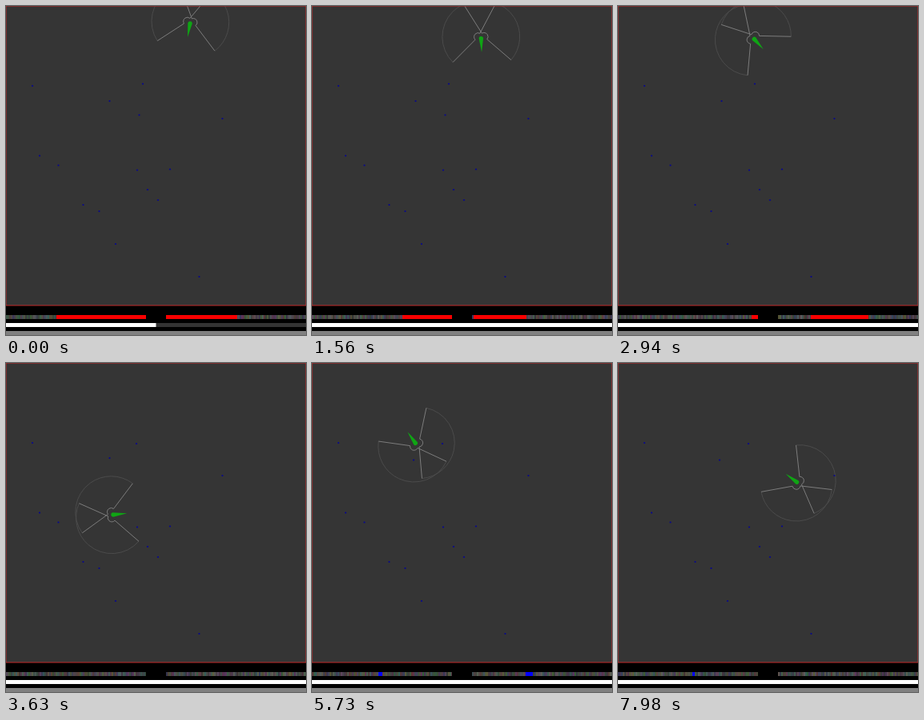
Animation, 375 px wide and 412 px high, one loop 8000 ms. Source, as an HTML page with a canvas:

```html
<!DOCTYPE html>
<html lang="en">
<head>
<meta charset="utf-8">
<title>Agent with two eyes</title>
<style>
  html, body { margin: 0; width: 100%; height: 100%; overflow: hidden; background: #000; }
  canvas { display: block; width: 375px; height: 412px; }
</style>
</head>
<body>
<canvas id="stage" width="375" height="412"></canvas>
<script>
const ctx = document.getElementById('stage').getContext('2d');
const LOOP = 8000, STEP = 30, SIZE = 375;
const RANGE = 44.7, EYE = 5, STRIP = 175, TURN = 42;
const rad = deg => deg * Math.PI / 180;
const mix = (a, b, k) => a + (b - a) * k;

const poses = [
  { t: 0, x: 230, y: 22, deg: -80 },
  { t: 870, x: 217.5, y: 4.4, deg: -104 },
  { t: 2280, x: 205, y: 129, deg: -80 },
  { t: 3630, x: 134, y: 190, deg: -186 },
  { t: 5730, x: 129.3, y: 100.4, deg: -305 },
  { t: 6960, x: 233.7, y: 76.1, deg: -318 },
  { t: LOOP, x: 223.3, y: 155, deg: -323.4 }
];

// The agent bumps into the first dots: two get pushed, one is eaten.
const pushed = [
  { from: [171, 97.5], to: [163, 101], at: 3000 },
  { from: [129.5, 119], to: [127, 121.5], at: 4900 },
  { from: [166.5, 136.5], at: 2850 }
];
const still = [
  [33, 100], [270.5, 141], [42, 187.5], [65.5, 199.5], [164, 205.5], [205, 204.5],
  [177, 230], [190, 243], [96.5, 249], [116.5, 257], [137, 298], [241.5, 339]
];

function dotsAt(t) {
  const moving = pushed.map(d => t < d.at ? d.from : d.to).filter(Boolean);
  return still.concat(moving);
}

// Between two poses the agent runs up towards the top wall and comes back.
function poseAt(t) {
  const i = poses.findIndex(p => p.t > t);
  const a = poses[i - 1], b = poses[i];
  const k = (t - a.t) / (b.t - a.t);
  const lift = Math.max(0, (a.y + b.y) / 2 - TURN);
  return {
    x: mix(a.x, b.x, k),
    y: mix(a.y, b.y, k) - lift * Math.sin(Math.PI * k),
    heading: rad(mix(a.deg, b.deg, k))
  };
}

function makeEye(pose, side) {
  const a = pose.heading + side * rad(60);
  const middle = pose.heading + side * rad(51.5);
  return {
    x: pose.x + 4.3 * Math.cos(a), y: pose.y + 4.3 * Math.sin(a),
    from: middle - rad(81.5), to: middle + rad(81.5)
  };
}

function drawEye({ x, y, from, to }) {
  ctx.lineWidth = 1;
  ctx.strokeStyle = '#4b4b4b';
  ctx.beginPath();
  ctx.arc(x, y, RANGE, from, to);
  ctx.stroke();
  ctx.strokeStyle = '#7c7c7c';
  ctx.beginPath();
  ctx.arc(x, y, EYE, from, to);
  for (const a of [from, to]) {
    ctx.moveTo(x + EYE * Math.cos(a), y + EYE * Math.sin(a));
    ctx.lineTo(x + RANGE * Math.cos(a), y + RANGE * Math.sin(a));
  }
  ctx.stroke();
}

function drawBody({ x, y, heading }) {
  ctx.save();
  ctx.translate(x, y);
  ctx.rotate(heading + Math.PI);
  ctx.fillStyle = '#0fa514';
  ctx.beginPath();
  ctx.arc(0, 0, 2.7, Math.PI / 2, -Math.PI / 2);
  ctx.lineTo(17.3, 0);
  ctx.fill();
  ctx.restore();
}

function drawDot([x, y]) {
  ctx.fillStyle = '#080890';
  ctx.beginPath();
  ctx.arc(x, y, 1.1, 0, 2 * Math.PI);
  ctx.fill();
}

function randomFrom(seed) {
  return () => {
    seed = (Math.imul(seed, 1664525) + 1013904223) >>> 0;
    return seed / 4294967296;
  };
}

// Each column of a strip is one ray of the eye, from its first edge to its last.
function drawStrip(eye, left, dots, random) {
  const outside = v => v < 0 || v > SIZE;
  let noise;
  for (let i = 0; i < STRIP; i++) {
    const a = mix(eye.from, eye.to, (i + .5) / STRIP);
    const dx = Math.cos(a), dy = Math.sin(a);
    if (i % 2 === 0) noise = [0, 0, 0].map(() => Math.round(50 + 45 * random()));
    let color = `rgb(${noise})`;
    if (outside(eye.x + RANGE * dx) || outside(eye.y + RANGE * dy)) color = '#f80000';
    for (const [px, py] of dots) {
      const vx = px - eye.x, vy = py - eye.y;
      const along = vx * dx + vy * dy;
      if (along > 0 && along < RANGE && Math.abs(vx * dy - vy * dx) < 1.25) color = '#00f';
    }
    rect(color, left + i, 387, 1, 5);
  }
}

function rect(color, x, y, w, h) {
  ctx.fillStyle = color;
  ctx.fillRect(x, y, w, h);
}

function draw(t) {
  const pose = poseAt(t);
  const dots = dotsAt(t);
  const eyes = [makeEye(pose, -1), makeEye(pose, 1)];

  rect('#000', 0, 0, SIZE, 412);
  rect('#353535', 0, 0, SIZE, SIZE);
  ctx.save();
  ctx.beginPath();
  ctx.rect(0, 0, SIZE, SIZE);
  ctx.clip();
  eyes.forEach(drawEye);
  drawBody(pose);
  dots.forEach(drawDot);
  ctx.restore();
  ctx.lineWidth = 1;
  ctx.strokeStyle = '#c22a2a';
  ctx.strokeRect(0, 0, SIZE, SIZE);

  const random = randomFrom(t * 7919 + 17);
  drawStrip(eyes[0], 0, dots, random);
  drawStrip(eyes[1], 200, dots, random);

  rect('#333', 0, 397, SIZE, 5);
  rect('#fff', 0, 397, t < 210 ? SIZE / 2 : SIZE, 5);
  rect('#808080', 0, 407, SIZE, 5);
}

const start = performance.now();
function tick() {
  const t = (performance.now() - start) % LOOP;
  draw(Math.floor(t / STEP) * STEP);
  requestAnimationFrame(tick);
}
tick();
</script>
</body>
</html>
```
